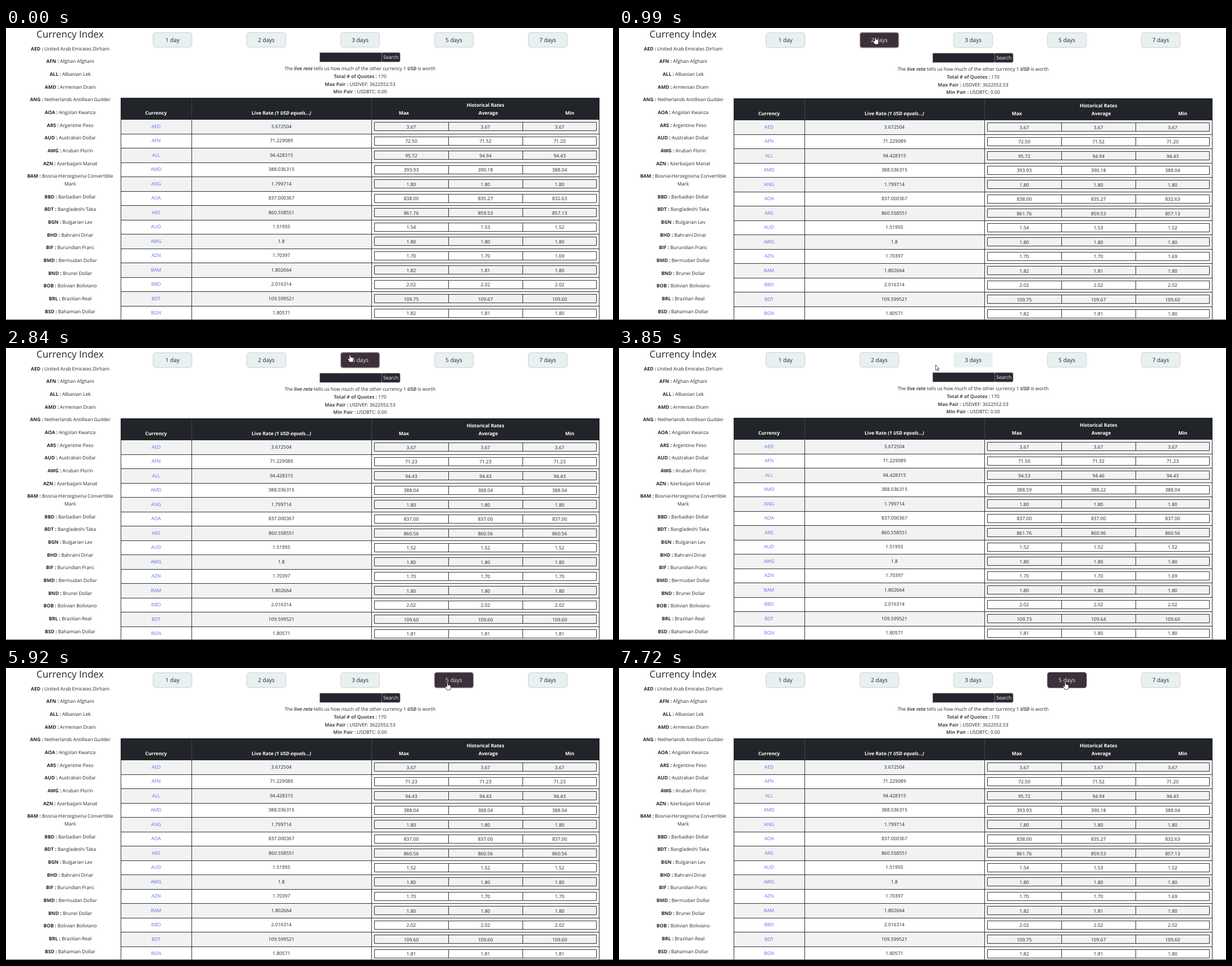
An HTML page for the animation above (8 s loop, 1080 px wide and 519 px high).

```html
<!DOCTYPE html>
<html lang="en">
<head>
<meta charset="utf-8">
<title>Currency Index</title>
<style>
  html, body { margin: 0; width: 100%; height: 100%; overflow: hidden; background: #fff; }
  svg { display: block; width: 100vw; height: 100vh; }
  text {
    font: 8.5px "Open Sans", "Noto Sans", sans-serif;
    fill: #212529; text-anchor: middle; text-rendering: geometricPrecision;
  }
  .title { font-size: 17px; }
  .b { font-weight: 700; }
  .i { font-style: italic; }
  .info, .info .b { fill: #5c5f63; }
  .info .b { fill: #45484c; }
  .head { font-weight: 700; fill: #fff; }
  .link { fill: #5f70f0; }
  .search { font-size: 8.7px; fill: #f4f4f4; }
  .days text { font-size: 10px; }
  .days .edge { fill: none; stroke: #d8cdca; }
  .line { fill: none; stroke: #1c1c1c; stroke-width: .9; }
</style>
</head>
<body>
<svg id="stage" viewBox="0 0 1080 519" preserveAspectRatio="none">
  <g id="index"><text class="title" x="114" y="17">Currency Index</text></g>
  <g id="buttons"></g>
  <g id="page">
    <rect x="558.5" y="44" width="109.5" height="16" fill="#26242e" stroke="#55515c" stroke-width=".8"/>
    <rect x="668.5" y="44" width="32.5" height="16" rx="2" fill="#2a2833" stroke="#55515c" stroke-width=".8"/>
    <text class="search" x="684.8" y="55.2">Search</text>
    <g class="info">
      <text x="630" y="75.3">The <tspan class="b i">live rate</tspan> tells us how much of the other currency 1 <tspan class="b i">USD</tspan> is worth</text>
      <text x="630" y="88.9"><tspan class="b">Total # of Quotes :</tspan> 170</text>
      <text x="630" y="102.5"><tspan class="b">Max Pair :</tspan> USDVEF: 3622552.53</text>
      <text x="630" y="116.1"><tspan class="b">Min Pair :</tspan> USDBTC: 0.00</text>
    </g>
  </g>
  <rect x="0" y="518" width="1080" height="1" fill="#55585b"/>
  <g id="cursor" stroke="#222" stroke-width=".8" stroke-linejoin="round" fill="#fff">
    <path id="arrow" d="M0 0V9.4L2.2 7.4L3.7 10.8L5.2 10.1L3.7 6.9H6.6Z"/>
    <path id="hand" d="M-1 .8Q0 -.6 1 .8V4.3Q2 3.5 2.8 4.6Q3.9 4 4.5 5.1Q6 4.8 6 6.3V9Q6 11 5 13H-.8Q-1.6 10.8-3.6 8.6Q-4.5 7-3.1 6.6Q-2 6.6-1 8Z"/>
  </g>
</svg>
<script>
const $ = id => document.getElementById(id);
const LOOP = 8000;

function add(parent, tag, attrs, html = '') {
  const el = document.createElementNS('http://www.w3.org/2000/svg', tag);
  for (const k in attrs) el.setAttribute(k, attrs[k]);
  el.innerHTML = html;
  return parent.appendChild(el);
}
const label = (parent, x, y, html, cls = '') => add(parent, 'text', { x, y, class: cls }, html);
const box = (parent, x, y, width, height, attrs) => add(parent, 'rect', { x, y, width, height, ...attrs });
const line = (parent, d, stroke) => add(parent, 'path', stroke ? { d, class: 'line', style: 'stroke:' + stroke } : { d, class: 'line' });

// Sidebar; "|" marks a wrapped line
const names = `AED United Arab Emirates Dirham
AFN Afghan Afghani
ALL Albanian Lek
AMD Armenian Dram
ANG Netherlands Antillean Guilder
AOA Angolan Kwanza
ARS Argentine Peso
AUD Australian Dollar
AWG Aruban Florin
AZN Azerbaijani Manat
BAM Bosnia-Herzegovina Convertible|Mark
BBD Barbadian Dollar
BDT Bangladeshi Taka
BGN Bulgarian Lev
BHD Bahraini Dinar
BIF Burundian Franc
BMD Bermudan Dollar
BND Brunei Dollar
BOB Bolivian Boliviano
BRL Brazilian Real
BSD Bahamian Dollar`.split('\n');
let y = 39.6;
for (const entry of names) {
  const [first, rest] = entry.slice(4).split('|');
  label($('index'), 114.2, y, `<tspan class="b">${entry.slice(0, 3)} :</tspan> ${first}`);
  if (rest) label($('index'), 114.2, y += 13.6, rest);
  y += 22.67;
}

// Table
const live = ['3.672504', '71.229089', '94.428315', '388.036315', '1.799714', '837.000367', '860.558551',
  '1.51955', '1.8', '1.70397', '1.802664', '2.016314', '109.599521', '1.80571'];
// Max, average and min where they differ from the live rate
const shared = { AZN: '1.70 1.70 1.69' };
const longer = { ...shared, BAM: '1.82 1.81 1.80', BDT: '109.75 109.67 109.60', BGN: '1.82 1.81 1.80' };
const history = {
  2: {},
  3: { ...shared, AFN: '71.50 71.32 71.23', ALL: '94.53 94.46 94.43', AMD: '388.59 388.22 388.04',
    ARS: '861.76 860.96 860.56', BDT: '109.73 109.64 109.60', BGN: '1.81 1.80 1.80' },
  5: { ...longer, AFN: '71.50 71.39 71.23', ALL: '95.72 94.82 94.43', AMD: '390.99 389.07 388.04',
    AOA: '837.00 835.25 832.63', ARS: '861.76 859.58 857.50', AUD: '1.54 1.52 1.52' },
  7: { ...longer, AFN: '72.50 71.52 71.20', ALL: '95.72 94.94 94.43', AMD: '393.93 390.18 388.04',
    AOA: '838.00 835.27 832.63', ARS: '861.76 859.53 857.13', AUD: '1.54 1.53 1.52' }
};
const page = $('page');
const TOP = 162.5, STEP = 25.5;
const cells = live.map((rate, i) => {
  const top = Math.floor(TOP + STEP * i), base = TOP + STEP * i;
  const code = names[i].slice(0, 3);
  if (i % 2 === 0) box(page, 204, top, 852, 26, { fill: '#f2f2f2' });
  if (i) line(page, `M204 ${top + .5}H1056`);
  label(page, 267, base + 15.1, code, 'link');
  label(page, 490, base + 15.1, rate);
  const t = Math.floor(base + 5) + .5;
  line(page, `M655.5 ${t}H1050.5V${t + 15}H655.5ZM787.5 ${t}v15M919.5 ${t}v15`);
  return [721, 853, 985].map(x => label(page, x, base + 16.2, ''));
});
line(page, 'M204.5 163V519M330.5 163V519M650.5 163V519M1055.5 163V519');
box(page, 204, 124, 852, 39, { fill: '#212529' });
line(page, 'M330.5 124V163M650.5 124V163', '#43474b');
label(page, 267, 154.3, 'Currency', 'head');
label(page, 490, 154.3, 'Live Rate <tspan class="i">(1 USD equals...)</tspan>', 'head');
label(page, 853, 139.6, 'Historical Rates', 'head');
label(page, 708, 154.3, 'Max', 'head');
label(page, 858, 154.3, 'Average', 'head');
label(page, 1003, 154.3, 'Min', 'head');

// Day buttons
const buttons = [1, 2, 3, 5, 7].map((days, i) => {
  const g = add($('buttons'), 'g', { class: 'days' }), x = 296.3 + 166.9 * i;
  const shape = { rx: 4.5 };
  return {
    days, x,
    body: box(g, x - 35, 7.5, 70, 27, shape),
    edge: box(g, x - 34.5, 8, 69, 26, { ...shape, class: 'edge' }),
    text: label(g, x, 25.2, days + (days > 1 ? ' days' : ' day'))
  };
});

// [days, enter, leave]
const hovers = [[2, 985, 2488], [3, 2760, 3845], [2, 4270, 5305], [5, 5790, 6310], [7, 6672, 7085], [5, 7395, LOOP]];
// [time, days shown]
const clicks = [[0, 7], [2090, 2], [3440, 3], [4900, 2], [6130, 5], [6960, 7]];
// [time, x, y]
const path = [
  [230, 540, 514], [600, 498, 240], [985, 456, 16], [1060, 455, 17], [1420, 453, 15], [1885, 453, 15], [1890, 455, 16],
  [2090, 455, 16], [2280, 474, 22], [2420, 532, 33], [2840, 612, 12], [3235, 612, 12], [3240, 613, 12],
  [3510, 613, 12], [3710, 613, 12], [3780, 600, 21], [3850, 563.5, 30], [4470, 465, 32], [4610, 464, 31],
  [4750, 459, 22], [5239, 459, 22], [5240, 569, 56], [5650, 740, 34], [5990, 797, 24], [6130, 797, 24],
  [6680, 931, 16], [6890, 955, 22], [6960, 955, 22], [7500, 800, 24], [7720, 794, 25], [LOOP, 794, 25]
];
const FADE = 250;
const clamp = v => Math.max(0, Math.min(1, v));

function pointAt(t) {
  const n = path.findIndex(k => k[0] > t);
  const [t0, x0, y0] = path[n - 1], [t1, x1, y1] = path[n];
  const p = (t - t0) / (t1 - t0);
  return [x0 + (x1 - x0) * p, y0 + (y1 - y0) * p];
}

function drawButtons(t) {
  const lift = hovers.some(h => t >= h[1] && t < h[2]);
  for (const b of buttons) {
    const past = hovers.filter(h => h[0] === b.days && h[1] <= t).pop();
    const on = past && t < past[2];
    const since = past ? t - (on ? past[1] : past[2]) : LOOP;
    const shown = clamp((since - 20) / FADE);
    const top = lift && !on ? 8 : 7.5, h = on ? 28 : 27;
    b.body.setAttribute('y', top);
    b.body.setAttribute('height', h);
    b.edge.setAttribute('y', top + .5);
    b.edge.setAttribute('height', h - 1);
    b.body.style.fill = on ? '#3c303a' : '#e8f1f2';
    b.text.style.fill = on ? '#e6e4e6' : '#212529';
    b.edge.style.opacity = on ? 1 - shown : shown;
  }
  page.setAttribute('transform', `translate(0 ${lift ? 1 : 0})`);
}

let current;
function drawRates(t) {
  const days = clicks.filter(c => c[0] <= t).pop()[1];
  if (days === current) return;
  current = days;
  cells.forEach((row, i) => {
    const values = history[days][names[i].slice(0, 3)];
    row.forEach((cell, k) => {
      cell.textContent = values ? values.split(' ')[k] : (+live[i]).toFixed(2);
    });
  });
}

function drawCursor(t) {
  const visible = t >= path[0][0];
  $('cursor').style.display = visible ? '' : 'none';
  if (!visible) return;
  const [cx, cy] = pointAt(t);
  const over = cy > 7 && cy < 36 && buttons.some(b => Math.abs(cx - b.x) < 35);
  $('cursor').setAttribute('transform', `translate(${cx} ${cy})`);
  $('hand').style.display = over ? '' : 'none';
  $('arrow').style.display = over ? 'none' : '';
}

function draw(now) {
  const t = now % LOOP;
  drawButtons(t);
  drawRates(t);
  drawCursor(t);
}

const start = performance.now();
function tick() {
  draw(performance.now() - start);
  requestAnimationFrame(tick);
}
tick();
</script>
</body>
</html>
```
